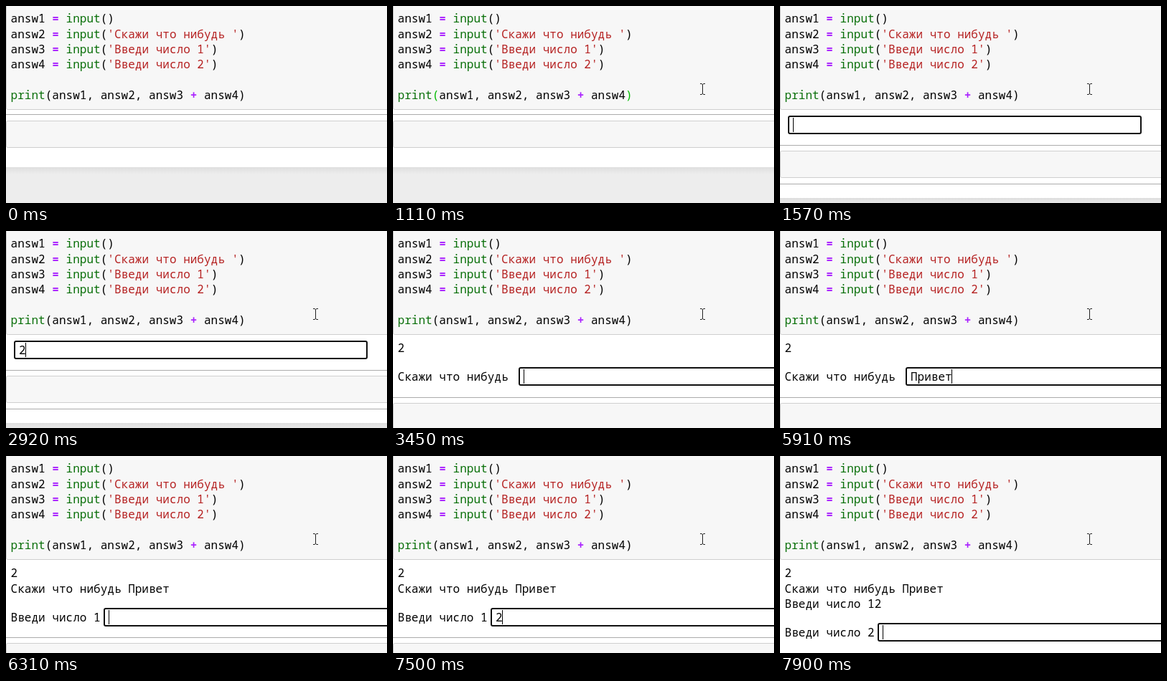
An HTML page for the animation above (8 s loop, 531x275 px).

```html
<!DOCTYPE html>
<html lang="ru">
<head>
<meta charset="utf-8">
<style>
html, body { margin: 0; width: 100%; height: 100%; overflow: hidden; background: #fff; }
svg { display: block; }
text { font: 16px "Noto Sans Mono", "DejaVu Sans Mono", monospace; letter-spacing: .02px; white-space: pre; }
.cell { fill: #f7f7f7; stroke: #cfcfcf; }
.op { fill: #a2f; font-weight: bold; }
.fn { fill: #0a700a; }
.str { fill: #b52020; }
.match .br { fill: #0b0; }
</style>
</head>
<body>
<svg width="531" height="275" viewBox="0 0 531 275">
  <defs>
    <linearGradient id="shade" x2="0" y2="1">
      <stop stop-color="#dedede"/><stop offset="1" stop-color="#ededed"/>
    </linearGradient>
  </defs>
  <rect class="cell" x=".5" y="-9.5" width="540" height="154" rx="2"/>
  <g id="code"></g>
  <g id="out"></g>
  <path id="mouse" d="M-3-7.5H-1L.5-6.5 2-7.5H4M.5-6.5V6.5M-3 7.5H-1L.5 6.5 2 7.5H4" fill="none" stroke="#222"/>
</svg>
<script>
const LOOP = 8000, CHAR = 9.62, LEFT = 6.6, ROW = 21.25;
const $ = id => document.getElementById(id);
const text = (x, y, s) => `<text x="${x}" y="${Math.round(y)}">${s}</text>`;
const rect = (x, y, w, h, fill) => `<rect x="${x}" y="${y}" width="${w}" height="${h}" fill="${fill}"/>`;
const span = (cls, s) => `<tspan class="${cls}">${s}</tspan>`;
const rows = (top, list) => list.map((s, i) => text(LEFT, top + ROW * i, s)).join("");

const prompts = ["", "'Скажи что нибудь '", "'Введи число 1'", "'Введи число 2'"];
const input = (p, i) => `answ${i + 1} ${span("op", "=")} ${span("fn", "input")}(${span("str", p)})`;
$("code").innerHTML = rows(23.3, [...prompts.map(input), "",
  `${span("fn", "print")}${span("br", "(")}answ1, answ2, answ3 ${span("op", "+")} answ4${span("br", ")")}`]);

// Output stages: finished rows, cell divider, and the open input field (prompt, caret top)
const done = ["2", "Скажи что нибудь Привет", "Введи число 12"];
const stages = [
  { at: 0, rows: 0, line: 151 },
  { at: 1570, rows: 0, line: 194, x: 18, y: 156, prompt: "" },
  { at: 3380, rows: 1, line: 181 },
  { at: 3450, rows: 1, line: 232, x: 182, y: 193, prompt: "Скажи что нибудь " },
  { at: 6310, rows: 2, line: 253, x: 143, y: 215, prompt: "Введи число 1" },
  { at: 7830, rows: 3, line: 224 },
  { at: 7900, rows: 3, line: 275, x: 143, y: 236, prompt: "Введи число 2" }
];
const keys = [[2920, "2"], [4770, "П"], [4870, "р"], [4970, "и"], [5520, "в"], [5780, "е"], [5910, "т"], [7500, "2"]];
const caretOff = [[0, 650], [1110, 1570], [2100, 2650], [3980, 4440], [6840, 7440]];

function drawOutput(t) {
  const s = stages.findLast(s => s.at <= t);
  const caret = !caretOff.some(([a, b]) => t >= a && t < b);
  const idle = s.at === 0;
  const top = s.line + (idle ? 9 : 8);
  const foot = s.line + 74;
  let html = rect(0, s.line, 531, 1, "#ababab")
    + `<rect class="cell" x=".5" y="${top + .5}" width="540" height="37" rx="2"/>`
    + rect(0, foot, 531, 60, "#ededed") + rect(0, foot, 531, 10, "url(#shade)");
  if (!idle) html += rect(0, s.line + 54, 531, 1, "#ababab");
  html += rows(169.3, done.slice(0, s.rows));
  if (s.x) {
    const typed = keys.filter(([k]) => k >= s.at && k <= t).map(k => k[1]).join("");
    html += text(LEFT, s.y + 16, s.prompt)
      + `<rect x="${s.x - 6}" y="${s.y - 2}" width="491" height="24" rx="2" fill="#fff" stroke="#101010" stroke-width="2"/>`
      + text(s.x, s.y + 16, typed);
    if (caret) html += rect(Math.floor(s.x + typed.length * CHAR), s.y, 1, 20, "#000");
  } else if (idle && caret) {
    html += rect(333, 114, 1, 21, "#000");
  }
  $("out").innerHTML = html;
}

// The pointer glides in from the right edge in eight short steps
function drawMouse(t) {
  const step = Math.max(0, Math.min(8, Math.floor((t - 110) / 77.1) + 1));
  const left = (1 - step / 8) ** 2;
  $("mouse").setAttribute("transform", `translate(${Math.round(431 + 112 * left)} ${Math.round(116 + 130 * left)})`);
}

const start = performance.now();
function frame() {
  const t = (performance.now() - start) % LOOP;
  $("code").setAttribute("class", t >= 650 && t < 1570 ? "match" : "");
  drawOutput(t);
  drawMouse(t);
  requestAnimationFrame(frame);
}
frame();
</script>
</body>
</html>
```
